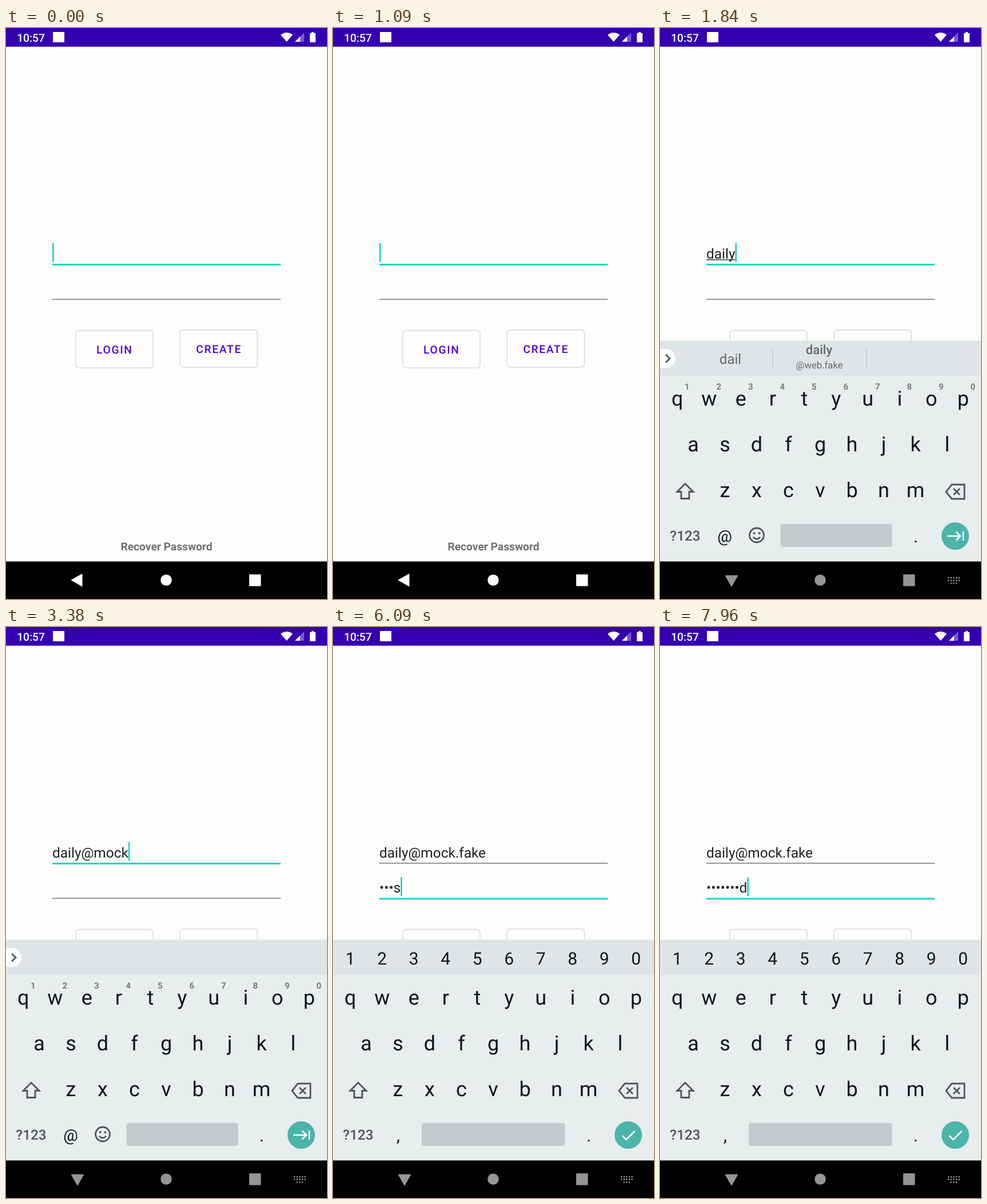
Write an HTML page that moves like this. It is 561 px wide and 998 px high and loops after 8 s.

```html
<!DOCTYPE html>
<html lang="en">
<head>
<meta charset="utf-8">
<title>Login screen</title>
<style>
  html, body { margin: 0; width: 100%; height: 100%; overflow: hidden; background: #fdfdfc; }
  svg { display: block; width: 100vw; height: 100vh; font-family: Roboto, sans-serif; text-rendering: geometricPrecision; }
  .mid { text-anchor: middle; }
  .input { font-size: 24.4px; fill: #212123; }
  .button rect { fill: none; stroke: #dcdce1; stroke-width: 1.6; }
  .button text { font-size: 19.2px; font-weight: 500; letter-spacing: 1.7px; fill: #5200dd; }
  .key { font-size: 36px; fill: #06181f; }
  .number { font-size: 30px; fill: #06181f; }
  .hint { font-size: 15px; font-weight: 700; fill: #747d80; }
  .chip { fill: #5f6a6f; }
  .icon { fill: none; stroke: #4a575d; stroke-width: 2.8; }
  .mark { fill: none; stroke: #fff; stroke-width: 2.5; }
  .space { fill: #c5cbcd; }
</style>
</head>
<body>
<svg viewBox="0 0 561 998" preserveAspectRatio="none">
  <rect width="561" height="998" fill="#fdfdfc"/>

  <!-- Status bar -->
  <rect width="561" height="32.700" fill="#3500b1"/>
  <g fill="#fff">
    <text x="19.2" y="24" font-size="19.2" font-weight="500">10:57</text>
    <rect x="82" y="7" width="20" height="18"/>
    <path d="M480 12Q490.500 4 501 12L490.500 24Z"/>
    <path d="M521 8V24H505Z" opacity=".35"/>
    <path d="M514 15V24H505Z"/>
    <path d="M534 7h4v2h3v16h-10v-16h3Z"/>
  </g>

  <!-- Form -->
  <rect id="emailLine" x="81" width="399"/>
  <rect id="passwordLine" x="81" width="399"/>
  <text id="email" class="input" x="81" y="402.500"></text>
  <rect id="composing" x="81" y="404.300" height="1.500" fill="#333"/>
  <text id="password" class="input" x="81" y="463.500"></text>
  <rect id="cursor" width="2.600" height="33" fill="#16d2c1"/>
  <g class="button">
    <rect x="121.800" y="528.600" width="135.200" height="65.400" rx="6"/>
    <text x="158" y="569">LOGIN</text>
    <rect x="304" y="527.600" width="135.400" height="65.400" rx="6"/>
    <text x="332.300" y="568">CREATE</text>
  </g>
  <text class="mid" x="280.500" y="913" font-size="19.2" font-weight="700" fill="#707073">Recover Password</text>

  <!-- Keyboard -->
  <g id="keyboard">
    <rect y="546" width="561" height="2" fill="#eff2f2"/>
    <rect y="547" width="561" height="62" fill="#dfe5e6"/>
    <rect y="608" width="561" height="325" fill="#e8edee"/>
    <g id="letters"></g>
    <path class="icon" d="M44 796.500L58 810.500H51V822.500H37V810.500H30Z"/>
    <path class="icon" d="M510 798H532V823H510L500 810.500ZM513 805l11 11m0-11l-11 11"/>
    <text class="mid" x="44" y="896" font-size="24.3" font-weight="500" fill="#4a575d">?123</text>
    <text class="mid number" x="447" y="899">.</text>
    <circle cx="516" cy="888" r="24" fill="#4bb5aa"/>

    <g id="emailKeys">
      <g id="hints"></g>
      <path d="M0 561H10.500A16.500 16.500 0 0 1 10.500 594H0Z" fill="#fdfefd"/>
      <path class="icon" d="M10 571l7 6.700l-7 6.700"/>
      <g id="suggestions" class="chip">
        <path d="M197 561v33M361 561v33" stroke="#c3cacc" stroke-width="1.500"/>
        <text class="mid" x="123" y="587" font-size="24">dail</text>
        <text class="mid" x="278" y="570" font-size="22" font-weight="500">daily</text>
        <text class="mid" x="278.500" y="595" font-size="16.700">@web.fake</text>
      </g>
      <text class="mid" x="113" y="898" font-size="28.500" fill="#06181f">@</text>
      <circle class="icon" cx="169" cy="886.500" r="12.500"/>
      <path class="icon" d="M163 889.500a6.500 5.500 0 0 0 12 0"/>
      <circle cx="164.500" cy="883" r="2" fill="#4a575d"/>
      <circle cx="173.500" cy="883" r="2" fill="#4a575d"/>
      <rect class="space" x="210.500" y="867" width="195" height="40" rx="4"/>
      <path class="mark" d="M502 888h23m-7.500-7.500l7.500 7.500l-7.500 7.500M530 880v16"/>
    </g>

    <g id="passwordKeys">
      <g id="numbers"></g>
      <text class="mid number" x="114" y="899">,</text>
      <rect class="space" x="155" y="867" width="250.500" height="40" rx="4"/>
      <path class="mark" d="M505.500 889l7 7l15-15"/>
    </g>
  </g>

  <!-- Navigation bar -->
  <rect y="932.400" width="561" height="66"/>
  <g id="nav" stroke-linejoin="round" stroke-width="2">
    <path id="back" d="M115 965L132.500 955V975Z"/>
    <path id="hide" d="M115 957.500H135L125 975Z"/>
    <circle cx="280" cy="965" r="8.800"/>
    <rect x="426" y="956" width="18.500" height="18.500"/>
  </g>
  <path id="switcher" d="M503 961h21M503 965.500h21M507.500 970.500h12" stroke="#959595" stroke-width="2.400" stroke-dasharray="2.400 2.200"/>
</svg>

<script>
  const LOOP = 8000, SHOW = 1150, SLIDE = 200, SWITCH = 4800, BLINK = 500;
  const EMAIL = 'daily@mock.fake', PASSWORD = 'password';
  const TEAL = '#16d2c1', GRAY = '#77777c';

  const $ = id => document.getElementById(id);
  const series = (count, start, step) => Array.from({ length: count }, (_, i) => start + i * step);
  const emailTimes = [...series(5, 1240, 140), ...series(10, 2080, 284)];
  const passwordTimes = series(8, 4940, 370);

  function addRow(parent, chars, x, y, cls) {
    [...chars].forEach((char, i) => {
      const text = document.createElementNS($('nav').namespaceURI, 'text');
      text.setAttribute('class', 'mid ' + cls);
      text.setAttribute('x', x + i * 55.5);
      text.setAttribute('y', y);
      text.textContent = char;
      $(parent).append(text);
    });
  }
  addRow('letters', 'qwertyuiop', 30.3, 660, 'key');
  addRow('letters', 'asdfghjkl', 58, 740, 'key');
  addRow('letters', 'zxcvbnm', 113.5, 820, 'key');
  addRow('hints', '1234567890', 47.3, 632, 'hint');
  addRow('numbers', '1234567890', 30.3, 589.5, 'number');

  const set = (id, attrs) => {
    for (const name in attrs) $(id).setAttribute(name, attrs[name]);
  };
  const show = (id, on) => { $(id).style.display = on ? '' : 'none'; };
  const typed = (times, t) => times.filter(time => time <= t).length;

  const setLine = (id, y, active) =>
    set(id, { y, height: active ? 2.8 : 1.5, fill: active ? TEAL : GRAY });

  function draw(t) {
    const open = t >= SHOW, onPassword = t >= SWITCH;
    const emailCount = typed(emailTimes, t), passwordCount = typed(passwordTimes, t);
    $('email').textContent = EMAIL.slice(0, emailCount);
    $('password').textContent = passwordCount
      ? '•'.repeat(passwordCount - 1) + PASSWORD[passwordCount - 1] : '';
    setLine('emailLine', 412.1, !onPassword);
    setLine('passwordLine', 473.5, onPassword);

    const composing = emailCount > 0 && emailCount <= 5;
    show('composing', composing);
    if (composing) set('composing', { width: $('email').getComputedTextLength() });
    show('suggestions', emailCount === 4 || emailCount === 5);

    const field = $(onPassword ? 'password' : 'email');
    const lastInput = Math.max(0, ...[SWITCH, ...emailTimes, ...passwordTimes].filter(time => time <= t));
    set('cursor', { x: 81 + field.getComputedTextLength(), y: onPassword ? 437.5 : 376 });
    show('cursor', (t - lastInput) % (2 * BLINK) < BLINK);

    const left = 1 - Math.min(1, Math.max(0, (t - SHOW) / SLIDE));
    set('keyboard', { transform: `translate(0 ${387 * left ** 3})` });
    show('keyboard', open);
    show('emailKeys', !onPassword);
    show('passwordKeys', onPassword);

    const navColor = open ? '#959595' : '#fff';
    set('nav', { fill: navColor, stroke: navColor });
    show('back', !open);
    show('hide', open);
    show('switcher', open);
  }

  const start = performance.now();
  function frame() {
    draw((performance.now() - start) % LOOP);
    requestAnimationFrame(frame);
  }
  frame();
</script>
</body>
</html>
```
